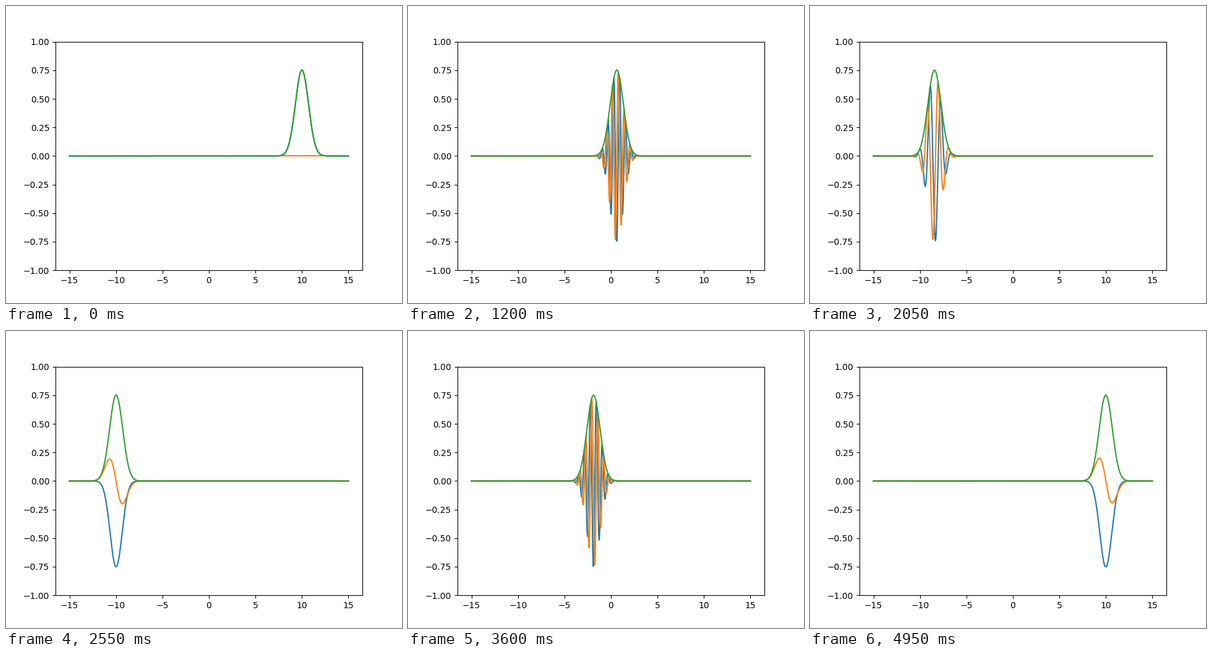
Animation of 640 by 480 pixels, one loop 5000 ms. Source, as a matplotlib script:

```python
import numpy as np
import matplotlib.pyplot as plt
from matplotlib.animation import FuncAnimation

FRAMES = 100
INTERVAL = 50  # ms
X0 = 10        # starting displacement of the packet

x = np.linspace(-15, 15, 1000)


def packet(t):
    """Wave packet swinging in a harmonic well, with rigid Gaussian envelope."""
    centre = X0 * np.cos(t)
    momentum = -X0 * np.sin(t)
    envelope = np.pi ** -0.25 * np.exp(-(x - centre) ** 2)
    phase = momentum * (x - centre / 2)
    return envelope * np.exp(1j * phase)


fig, ax = plt.subplots(figsize=(6.4, 4.8), dpi=100)
start = packet(0)
real_line, = ax.plot(x, start.real)
imag_line, = ax.plot(x, start.imag)
abs_line, = ax.plot(x, np.abs(start))
ax.set_ylim(-1, 1)


def update(frame):
    psi = packet(2 * np.pi * frame / FRAMES)
    real_line.set_ydata(psi.real)
    imag_line.set_ydata(psi.imag)
    abs_line.set_ydata(np.abs(psi))
    return real_line, imag_line, abs_line


anim = FuncAnimation(fig, update, frames=FRAMES, interval=INTERVAL, repeat=True)
plt.show()
```
